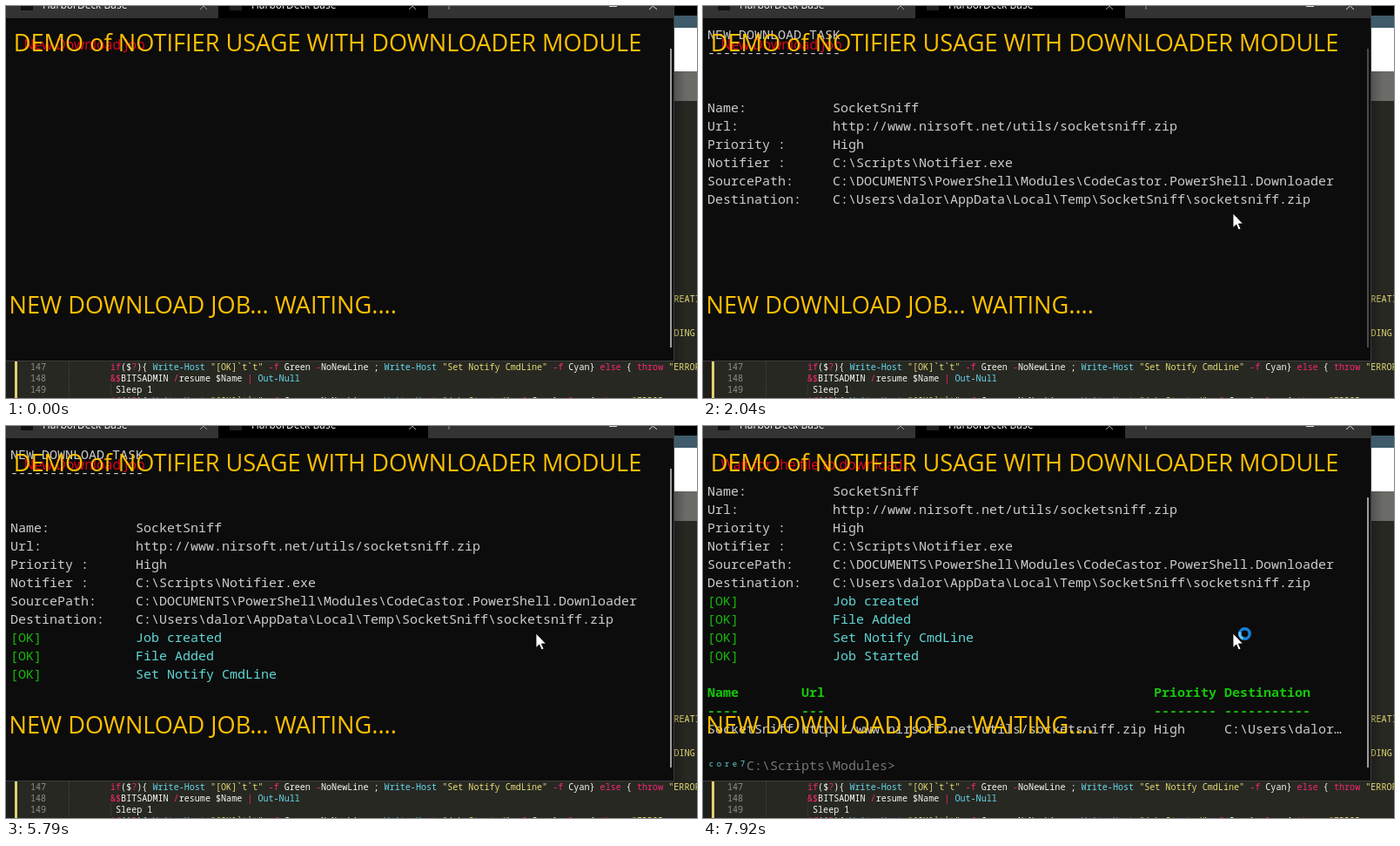
These frames come from a looping animation (794 by 450 pixels, 8000 ms). An HTML page:

```html
<!DOCTYPE html>
<html lang="en">
<head>
<meta charset="utf-8">
<title>Downloader demo</title>
<style>
html, body { margin: 0; width: 100%; height: 100%; overflow: hidden; background: #272822; }
svg { display: block; width: 794px; height: 450px; }
text { white-space: pre; }
.term { font: 15px "Noto Sans Mono", "DejaVu Sans Mono", monospace; fill: #ccc; }
.code { font: 500 10.08px "Noto Sans Mono", "DejaVu Sans Mono", monospace; fill: #f8f8f2; }
.ui { font: 12px "Open Sans", "Noto Sans", sans-serif; fill: #fff; }
.caption { font: 27.1px "Open Sans", "Noto Sans", sans-serif; fill: #ffc000; }
.notice { font: 15.8px "Open Sans", "Noto Sans", sans-serif; fill: #e8001c; }
.ok { fill: #16b80c; }
.cyan { fill: #61d6d6; }
.head { fill: #16c60c; font-weight: 700; }
.dim { fill: #767676; }
.sup { fill: #61d6d6; font-size: 9px; letter-spacing: 3.6px; }
.k { fill: #f92672; }
.s { fill: #e6db74; }
.f { fill: #66d9ef; }
.num { fill: #90908a; }
</style>
</head>
<body>
<svg viewBox="0 0 794 450">
  <defs>
    <clipPath id="view"><rect y="24" width="767" height="383"/></clipPath>
    <linearGradient id="shade"><stop stop-opacity=".25"/><stop offset="1" stop-opacity="0"/></linearGradient>
  </defs>
  <rect width="794" height="450" fill="#272822"/>
  <g id="editor">
    <rect y="408" width="10" height="42" fill="#1d1e1a"/>
    <rect x="10" y="408" width="3" height="42" fill="#e2d06c"/>
    <path d="M72.5 408V450M120.5 434V447" stroke="#45463f" stroke-dasharray="1 1"/>
  </g>
  <rect x="767" width="27" height="11" fill="#000"/>
  <rect x="767" y="11" width="27" height="14" fill="#3f5b6b"/>
  <rect x="767" y="25" width="27" height="50" fill="#fff"/>
  <rect x="767" y="75" width="27" height="34" fill="#6b6b67"/>
  <rect x="767" y="75" width="14" height="333" fill="url(#shade)"/>

  <rect width="767" height="408" fill="#0c0c0c"/>
  <path d="M0 407.5H767.5V0" fill="none" stroke="#3c3c3c"/>
  <rect width="767" height="14" fill="#333"/>
  <rect x="244" width="241" height="14" fill="#000"/>
  <rect x="17" y="-9" width="14" height="14" fill="#111"/>
  <rect x="257" y="-9" width="14" height="14" fill="#222"/>
  <text class="ui" x="42" y="3">HarborDeck Base</text>
  <text class="ui" x="282" y="3">HarborDeck Base</text>
  <path d="M223 4L227 0L231 4M463 4L467 0L471 4M509 0V4M541 -2L543 0L545 -2" fill="none" stroke="#999"/>
  <path d="M693 .5H702M739 4L743.500 0L748 4" fill="none" stroke="#ddd"/>

  <g clip-path="url(#view)"><g id="terminal"></g></g>
  <rect id="thumb" x="763" width="2" fill="#9d9d9d"/>
  <text id="notice" class="notice" x="20.500" y="50"></text>
  <text class="caption" x="8.800" y="52">DEMO of NOTIFIER USAGE WITH DOWNLOADER MODULE</text>
  <text class="caption" x="3.600" y="353">NEW DOWNLOAD JOB... WAITING....</text>

  <g id="spinner" fill="none" stroke-width="3.400">
    <circle cx="622.5" cy="238.5" r="5.700" stroke="#1583dd"/>
    <path id="arc" d="M622.5 232.8A5.700 5.700 0 0 1 628.2 238.5" stroke="#5cc0f8"/>
  </g>
  <path id="cursor" d="M0 0V16.500L3.800 13L6.400 19L9 17.800L6.400 12H11.500Z" fill="#fff" stroke="#000" stroke-width=".8"/>
</svg>
<script>
const LOOP = 8000, CELL = 9, ROW = 21;
const $ = id => document.getElementById(id);

function add(parent, tag, attrs, content = '') {
  const el = document.createElementNS('http://www.w3.org/2000/svg', tag);
  for (const key in attrs) el.setAttribute(key, attrs[key]);
  el.textContent = content;
  return parent.appendChild(el);
}

// Editor code: each token is "class|text".
function codeLine(x, y, ...tokens) {
  const line = add($('editor'), 'text', { class: 'code', x, y });
  for (const token of tokens) {
    const cut = token.indexOf('|');
    add(line, 'tspan', { class: token.slice(0, cut) }, token.slice(cut + 1));
  }
}
const report = (y, message) => codeLine(120, y, 'k|if', '|($', 'k|?', '|){ ', 'f|Write-Host ',
  's|"[OK]`t`t" ', 'k|-f', '| Green ', 'k|-', '|NoNewLine ; ', 'f|Write-Host ', `s|"${message}" `,
  'k|-f', '| Cyan} ', 'k|else', '| { ', 'k|throw ', 's|"ERROR');

for (let i = 0; i < 3; i++) codeLine(28, 418 + 13 * i, `num|${147 + i}`);
report(418, 'Set Notify CmdLine');
codeLine(120, 431, 'k|&$', '|BITSADMIN ', 'k|/', '|resume $Name ', 'k|| ', 'f|Out-Null');
codeLine(126, 444, '|Sleep 1');
report(457, 'Job Started');
codeLine(767.5, 340, 's|REATI');
codeLine(767.5, 379, 's|DING');

// Terminal output: each piece appears at its own time.
const pieces = [];
function put(at, row, col, content, cls = '') {
  const el = add($('terminal'), 'text',
    { class: `term ${cls}`, x: 5 + CELL * col, y: 38 + ROW * row }, content);
  pieces.push({ at, el });
  return el;
}

put(1270, 0, 0, 'NEW DOWNLOAD TASK');
put(1330, 1, 0, '-'.repeat(17));
[
  ['Name:', 'SocketSniff'],
  ['Url:', 'http://www.nirsoft.net/utils/socketsniff.zip'],
  ['Priority :', 'High'],
  ['Notifier :', 'C:\\Scripts\\Notifier.exe'],
  ['SourcePath:', 'C:\\DOCUMENTS\\PowerShell\\Modules\\CodeCastor.PowerShell.Downloader'],
  ['Destination:', 'C:\\Users\\dalor\\AppData\\Local\\Temp\\SocketSniff\\socketsniff.zip']
].forEach(([label, value], i) => {
  put(1390, 4 + i, 0, label);
  put(1390, 4 + i, 16, value);
});
[
  [3400, 3400, 'Job created'], [4530, 4620, 'File Added'],
  [5790, 5790, 'Set Notify CmdLine'], [6970, 6970, 'Job Started']
].forEach(([okAt, textAt, message], i) => {
  put(okAt, 10 + i, 0, '[OK]', 'ok');
  put(textAt, 10 + i, 16, message, 'cyan');
});

const SCROLL_AT = 7120;
[
  [0, 'Name', 'SocketSniff'], [12, 'Url', 'http://www.nirsoft.net/utils/socketsniff.zip'],
  [57, 'Priority', 'High'], [66, 'Destination', 'C:\\Users\\dalor…']
].forEach(([col, title, value]) => {
  put(SCROLL_AT, 15, col, title, 'head');
  put(SCROLL_AT, 16, col, '-'.repeat(title.length), 'head');
  put(SCROLL_AT, 17, col, value);
});
put(SCROLL_AT, 19, 0.2, 'core7', 'sup').setAttribute('dy', -4);
put(SCROLL_AT, 19, 5, 'C:\\Scripts\\Modules>', 'dim');

const show = (el, on) => el.setAttribute('visibility', on ? 'visible' : 'hidden');
const mix = (a, b, k) => a + (b - a) * k;

function cursorAt(t) {
  if (t < 1670) {
    const k = (t - 1420) / 250;
    return [mix(786, 692, k), mix(390, 259, k)];
  }
  const k = Math.min(1, (t - 1670) / 370), eased = 1 - (1 - k) ** 2;
  return [mix(692, 609, eased), mix(259, 238, eased)];
}

function thumbOpacity(t) {
  if (t < 1600 || t >= 3720) return 1;
  return t < 3600 ? 0.42 : 0.7;
}

function draw(t) {
  const scrolled = t >= SCROLL_AT;
  for (const { at, el } of pieces) show(el, t >= at);
  $('terminal').setAttribute('transform', `translate(0 ${scrolled ? -2 * ROW : 0})`);

  const top = scrolled ? 82 : 49;
  $('thumb').setAttribute('y', top);
  $('thumb').setAttribute('height', 392 - top);
  $('thumb').setAttribute('opacity', thumbOpacity(t));

  const waiting = t >= 6870;
  show($('notice'), t < 6730 || waiting);
  $('notice').textContent = waiting ? 'Wait for the file to download...' : 'New Download Job';

  show($('cursor'), t >= 1420);
  $('cursor').setAttribute('transform', `translate(${cursorAt(t).map(Math.round)})`);

  show($('spinner'), t >= 7460);
  const turn = Math.floor((t - 7460) / 77) * 40;
  $('arc').setAttribute('transform', `rotate(${turn} 622.5 238.5)`);
}

function tick() {
  draw(performance.now() % LOOP);
  requestAnimationFrame(tick);
}
tick();
</script>
</body>
</html>
```
